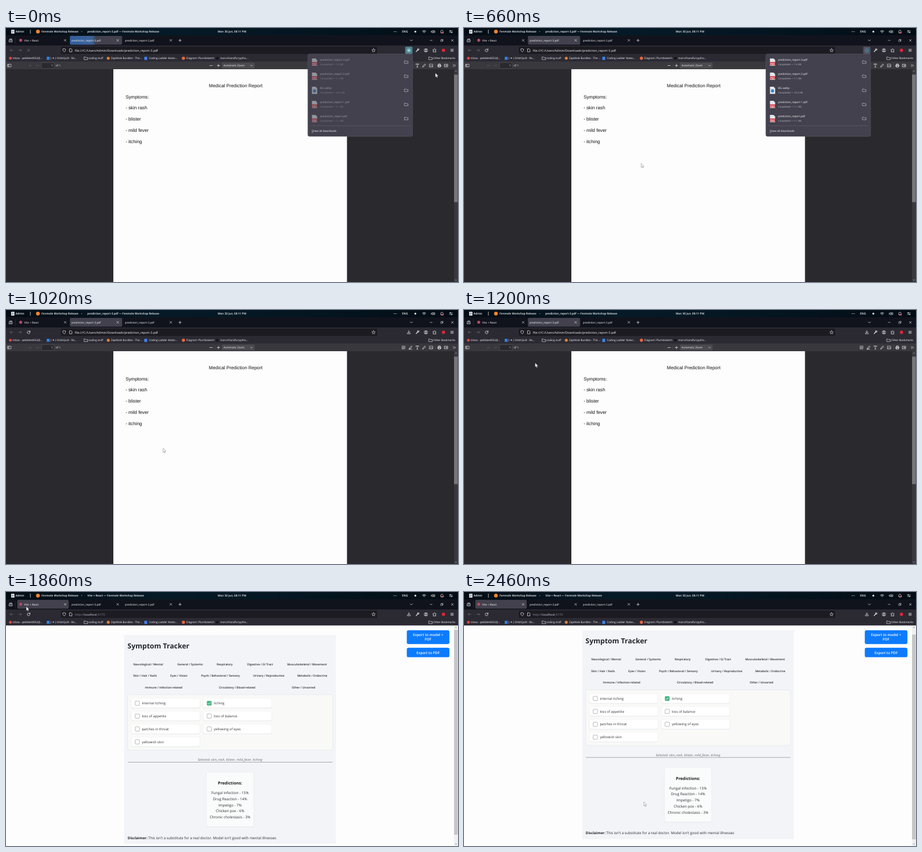
Recreate the animation shown at these times as an HTML page. Size 800x450 px, loop 2.52 s.

```html
<!DOCTYPE html>
<html lang="en">
<head>
<meta charset="utf-8">
<title>Symptom report</title>
<style>
  html, body { margin: 0; width: 100%; height: 100%; overflow: hidden; background: #2a2a2e; }
  svg { display: block; width: 100vw; height: 100vh; }
  text { font-family: "Open Sans", "Noto Sans", sans-serif; text-rendering: geometricPrecision; white-space: pre; }
  .pdf text { font-family: "Liberation Sans", Arial, sans-serif; }
</style>
</head>
<body>
<svg id="stage" viewBox="0 0 800 450" xmlns="http://www.w3.org/2000/svg"></svg>
<script>
const LOOP = 2520, STEP = 60;
const INK = '#fbfbfe', DIM = '#6f6e78';
const USER = 'Admin', BROWSER = 'Fenmole Workshop Release';

// Drawing helpers
const text = (x, y, s, size = 4.8, fill = INK, more = '') =>
  `<text x="${x}" y="${y}" font-size="${size}" fill="${fill}" ${more}>${s}</text>`;
const mid = (x, y, s, size, fill, more = '') => text(x, y, s, size, fill, `text-anchor="middle" ${more}`);
const rect = (x, y, w, h, fill, r = 0, more = '') =>
  `<rect x="${x}" y="${y}" width="${w}" height="${h}" rx="${r}" fill="${fill}" ${more}/>`;
const dot = (x, y, r, fill, more = '') => `<circle cx="${x}" cy="${y}" r="${r}" fill="${fill}" ${more}/>`;
const ring = (x, y, r, color = INK, w = 0.7) => dot(x, y, r, 'none', `stroke="${color}" stroke-width="${w}"`);
const line = (x, y, d, color = INK, w = 0.7) =>
  `<path transform="translate(${x} ${y})" d="${d}" fill="none" stroke="${color}" stroke-width="${w}" stroke-linecap="round" stroke-linejoin="round"/>`;
const group = (id, body, more = '') => `<g id="${id}" ${more}>${body}</g>`;
const bold = 'font-weight="700"', semi = 'font-weight="600"';

const CROSS = 'M-1.7-1.7 1.7 1.7M1.7-1.7-1.7 1.7';
const DOWN = 'M-2-1 0 1 2-1', UP = 'M-2 1 0-1 2 1';
const FOLDER = 'M-3-2.3h2.2l.8 1h3v3.6h-6z';
const SHEET = 'M-2-2.7h2.6l1.4 1.4v4h-4z';
const PANEL = 'M-3-2.3h6v4.6h-6zM-1-2.3v4.6M-2.3-.8h.6M-2.3.5h.6';
const PEN = 'M-2.5 2.5l.6-1.9 3.4-3.3 1.2 1.2-3.3 3.4z';

function titleBar() {
  return rect(0, 0, 800, 13.5, 'url(#sky)') +
    rect(9, 3, 6, 7, '#d9dde2', 0.8) + line(12, 6.5, 'M-1.6-1.5h3.2M-1.6 0h3.2M-1.6 1.5h2', '#59636d', 0.5) +
    text(17, 8.4, USER, 4.9, INK, semi) + rect(42.7, 3, 0.8, 7, '#dfe3e6') +
    dot(56.5, 6.4, 3.3, '#f0852d') + text(63, 8.4, BROWSER, 4.9, INK, semi) +
    dot(134, 6.5, 0.6, INK) +
    group('title', '') +
    mid(400, 8.4, 'Mon 30 Jun, 08:11 PM', 4.9, INK, semi) +
    [686.6, 688.8, 691].map(x => dot(x, 6.5, 0.6, INK)).join('') +
    text(701, 8.4, 'ENG', 5, INK, semi) + dot(724.5, 6.4, 1.7, '#e8eaee') +
    line(740, 7, 'M-3-1.4q3-2.6 6 0M-1.8.1q1.8-1.5 3.6 0M0 1.7v.1', INK, 0.8) +
    line(756, 6.5, 'M-3-.9h1.4l1.6-1.5v4.8l-1.6-1.5h-1.4zM1.2-1.2q1 1.2 0 2.4M2.4-2.2q1.8 2.2 0 4.4') +
    line(771.5, 6.5, 'M-2 1.4v-2q.2-2 2-2t2 2v2zM-.6 2.6h1.2') + dot(773.6, 8, 1.5, '#e5484d') +
    line(787.5, 6.5, 'M-2.6-1.3h5.2M-2.6 1.3h5.2') + dot(786.3, 5.2, 0.9, INK) + dot(788.8, 7.8, 0.9, INK);
}

function tabStrip() {
  const tabs = [[20, 32, 'Vite + React'], [113, 116, 'prediction_report-3.pdf'], [207, 210.5, 'prediction_report-2.pdf']];
  return rect(0, 13, 800, 18.5, '#11131c') +
    line(8.5, 22, 'M-2.5-1.2h5v3.8h-5zM-1.8-2.6h3.6M-.7.6h1.4') +
    rect(16, 16.5, 0.5, 11, '#3a3a46') +
    rect(20, 14, 91, 15.4, '#42414d', 2, 'id="tabApp"') +
    rect(113, 14, 92.5, 15.4, '#42414d', 2, 'id="tabPdf"') +
    rect(113, 14, 46, 15.4, 'url(#burst)', 2, 'id="flash"') +
    dot(26, 21.7, 2.6, '#b84a63') +
    tabs.map(([x, tx, s]) => text(tx, 23.6, s, 4.8) + line(x + 84.7, 21.8, CROSS, INK, 0.6)).join('') +
    line(308, 22, 'M-2.2 0h4.4M0-2.2v4.4') + line(717.5, 22, DOWN) +
    line(752.5, 22, 'M-1.8 0h3.6', INK, 0.6) + line(771.5, 22, 'M-1.8-.9h2.8v2.8h-2.8zM-.8-.9v-1h2.8v2.8h-1', INK, 0.5) +
    line(790, 22, CROSS, INK, 0.6);
}

function navBar() {
  return rect(0, 31, 800, 28.3, '#2b2a33') + rect(97, 33, 560, 13, '#1c1b22', 2) +
    line(10, 39.5, 'M2.6 0h-5.2M-.4-2.2-2.6 0l2.2 2.2', DIM) + line(25, 39.5, 'M-2.6 0h5.2M.4-2.2 2.6 0 .4 2.2', DIM) +
    group('stop', line(40, 39.5, CROSS, '#8d8c96')) +
    group('reload', line(40, 39.5, 'M2.3-.9a2.5 2.5 0 1 0 .2 1.4M2.6-2.7v2h-2')) +
    line(103, 39.5, 'M0-2.9l2.5.9q.2 3.6-2.5 5-2.7-1.4-2.5-5z') + line(114.8, 39.5, SHEET) +
    group('url', '') +
    line(650.5, 39.5, 'M0-3l.9 1.9 2.1.3-1.5 1.5.3 2.1-1.8-1-1.8 1 .3-2.1-1.5-1.5 2.1-.3z', INK, 0.6) +
    rect(706.5, 33, 13, 13, '#52525e', 2, 'id="dlBox"') +
    group('dlBusy', ring(713, 39.5, 3, '#8fe9f3', 0.8) + dot(713, 39.5, 1.6, '#c9f6f5')) +
    group('dlDone', ring(713, 39.5, 3, '#38b6e8') + line(713, 39.5, 'M-1.4 0l1 1.1 1.8-2', '#38b6e8')) +
    group('dlIdle', line(713, 39.3, 'M0-2.8v3.8M-1.7-.6 0 1.1 1.7-.6M-2.6 1.4v1.4h5.2v-1.4')) +
    line(728.2, 39.5, 'M-2.3 2.4l2.7-2.8', INK, 1.2) + line(728.5, 39.2, 'M2.6-1.6l-1.3 1.2-.9-.8 1.2-1.3q-2-.5-2.2 1.5 1 2 2.8.8.6-.5.4-1.4', INK, 0.7) +
    ring(743.2, 39.5, 3) + dot(743.2, 38.7, 1.1, INK) + line(743.2, 39.5, 'M-1.8 1.9q1.8-1.5 3.6 0', INK, 0.9) +
    line(758.5, 39.5, 'M-2.5-1.3h1.6q-.4-1.5.9-1.5t.9 1.5h1.6v1.5q-1.4-.2-1.4.8t1.4.8v1.2h-5v-1.4q1.3.1 1.3-.7t-1.3-.7z', INK, 0.6) +
    dot(774.3, 39.5, 2.9, '#e0263c') + line(789.5, 39.5, 'M-2.3-1.8h4.6M-2.3 0h4.6M-2.3 1.8h4.6');
}

function bookmarks() {
  const marks = [
    [12, 'Inbox - pebblet4052@...'], [79, '( ✦ ) OrbitQuilt - Ro...'], [146, 'coding stuff'],
    [186, 'ZapMole Bundles - The ...'], [253, 'Coding Ladder Notes...'],
    [319, 'Diagram: Plumbsketch'], [379, 'morvi/handful-pytho...'], [756, 'Other Bookmarks']];
  return marks.map(([x, s]) => text(x, 55.4, s, 4.75)).join('') +
    dot(7.8, 53.6, 2.5, '#e0473b') + rect(72, 51, 5.4, 5.4, '#2f7fe0') +
    line(141.5, 53.7, FOLDER, INK, 0.6) + dot(181, 53.6, 2.7, '#d9813a') + rect(244.8, 51, 5, 5.6, '#3f83f0') +
    dot(314, 53.6, 2.8, '#f2643c') + dot(374, 53.6, 2.7, '#17161c') + line(751.5, 53.7, FOLDER, INK, 0.6);
}

function scrollbar(top, bottom, track, thumb, arrow, thumbTop, thumbH, id) {
  return rect(793, top, 7, bottom - top, track) + rect(793, thumbTop, 6.5, thumbH, thumb, 0, `id="${id}"`) +
    line(796.4, top + 3.4, 'M-1.3.6 0-.6 1.3.6', arrow) + line(796.4, bottom - 3.4, 'M-1.3-.6 0 .6 1.3-.6', arrow);
}

function pdfView() {
  const rows = ['Symptoms:', '- skin rash', '- blister', '- mild fever', '- itching'];
  const tools =
    line(6, 66.5, PANEL, INK, 0.6) + line(43, 66.5, UP, DIM) + line(56, 66.5, DOWN, DIM) +
    rect(63, 61.3, 22, 10.4, '#2a2a2e', 1, 'stroke="#5f5f66" stroke-width=".5"') +
    text(82.5, 68.3, '1', 4.8, INK, 'text-anchor="end"') + text(88, 68.3, 'of 1', 4.8) +
    line(363, 66.5, 'M-2.3 0h4.6') + rect(369, 63, 0.4, 7, '#5c5c61') + line(376, 66.5, 'M-2.3 0h4.6M0-2.3v4.6') +
    rect(382, 61.2, 58, 10.6, '#4a4a4f', 1) + text(385, 68.3, 'Automatic Zoom', 4.8) + line(434.5, 66.6, 'M-1.5-.7 0 .8l1.5-1.5') +
    line(703.5, 66.5, 'M2.5-.5v3h-5v-5h3M-1 1l.4-1.3 2.7-2.7 1 1-2.7 2.6z', INK, 0.6) +
    line(716, 66.5, PEN + 'M-2.7 3h5', INK, 0.7) + line(728, 66.5, 'M-2.5-1.7v-1h5v1M0-2.7v5.4M-1 2.7h2') +
    line(740, 66.5, PEN) + line(752.5, 66.5, 'M-2.8-2.5h5.6v5h-5.6zM-2.4 1.7l1.8-2 1.2 1.2.8-.8 1.1 1.3', INK, 0.6) +
    rect(760, 63, 0.4, 7, '#5c5c61') +
    line(767, 66.5, 'M-1.6-.9v-1.9h3.2v1.9M-1.6 1.6h-1.2v-2.5h5.6v2.5h-1.2M-1.6.4h3.2v2.3h-3.2z', INK, 0.8) +
    line(779, 66.5, 'M-2.8-2.3h5.6v4.6h-5.6zM-1 0h2.2M.4-.9l.9.9-.9.9', INK, 0.7) +
    line(793.5, 66.5, 'M-2.2-1.8-.4 0l-1.8 1.8M.4-1.8 2.2 0 .4 1.8');
  return rect(0, 59, 800, 391, '#2a2a2e') + rect(190, 73, 413.5, 377, '#fdfdfd') +
    rect(0, 59, 800, 14, '#38383d') + tools +
    `<g class="pdf">${mid(406.5, 105, 'Medical Prediction Report', 8.3, '#111')}` +
    rows.map((s, i) => text(211.7, 124.6 + i * 19.75, s, 8.27, '#111')).join('') + '</g>' +
    scrollbar(73, 450, '#38383d', '#77777a', '#c9c9cc', 82.5, 226, 'thumbPdf');
}

function appView() {
  const ink = '#23272e';
  const tags = [
    [251.5, 0, 'Neurological / Mental'], [326, 0, 'General / Systemic'], [387, 0, 'Respiratory'],
    [449.8, 0, 'Digestive / GI Tract'], [532.8, 0, 'Musculoskeletal / Movement'],
    [246, 1, 'Skin / Hair / Nails'], [306, 1, 'Eyes / Vision'], [379.5, 1, 'Psych / Behavioral / Sensory'],
    [465, 1, 'Urinary / Reproductive'], [542, 1, 'Metabolic / Endocrine'],
    [279, 2, 'Immune / Infection-related'], [409, 2, 'Circulatory / Blood-related'], [526.5, 2, 'Other / Unsorted']];
  const signs = ['internal itching', 'itching', 'loss of appetite', 'loss of balance',
    'patches in throat', 'yellowing of eyes', 'yellowish skin'];
  const results = ['Fungal infection - 15%', 'Drug Reaction - 14%', 'Impetigo - 7%', 'Chicken pox - 6%', 'Chronic cholestasis - 3%'];
  const card = (x, y, w, h, fill) => rect(x - 0.5, y, w + 1, h + 1, '#dfe1e5', 3, 'opacity=".7"') + rect(x, y, w, h, fill, 3);
  const sign = (s, i) => {
    const x = 222 + (i % 2) * 127.3, y = 197 + (i >> 1) * 22.85, on = s === 'itching';
    return card(x, y - 8.2, 121, 16.2, '#fff') +
      rect(x + 6.6, y - 3.8, 7.6, 7.6, on ? '#3fb27f' : '#fff', 1, `stroke="${on ? '#3fb27f' : '#85868c'}" stroke-width=".6"`) +
      (on ? line(x + 10.4, y, 'M-2.2.1l1.6 1.6 2.9-3.3', '#fff', 1) : '') +
      text(x + 18.4, y + 2.1, s, 6.05, '#333');
  };
  const sheet = rect(209, 76, 375, 370, '#f3f4f7') +
    text(215, 99.5, 'Symptom Tracker', 12.5, ink, bold) +
    tags.map(([x, row, s]) => mid(x, 129.8 + row * 20.45, s, 5.07, ink, semi)).join('') +
    rect(215.5, 181.7, 362.5, 98.5, '#f9f9f8', 3, 'stroke="#dde1e6" stroke-width=".6"') +
    signs.map(sign).join('') +
    mid(396.5, 299.2, 'Selected: skin_rash, blister, mild_fever, itching', 5.75, '#6a6a6e', 'font-style="italic"') +
    rect(215.5, 301, 362.5, 0.8, '#929498') +
    card(355, 319.5, 83, 96, '#fafbfb') + mid(396.5, 341, 'Predictions:', 7.25, '#15171a', bold) +
    results.map((s, i) => mid(396.5, 357.9 + i * 10.85, s, 6.45, '#2b2d31')).join('') +
    text(215.3, 437.8, 'Disclaimer:', 6.25, ink, bold) +
    text(251.8, 437.8, 'This isn\'t a substitute for a real doctor. Model isn\'t good with mental illnesses', 6.33, ink);
  const label = (y, s) => mid(747, y, s, 6.25, '#fff', semi);
  return rect(0, 59, 800, 391, '#fdfdfd') + group('sheet', sheet) +
    rect(709.4, 67.7, 75.4, 24.6, '#0d7bfd', 3.2) + label(78.3, 'Export to model +') + label(86.3, 'PDF') +
    rect(709.4, 98.8, 75.4, 16.8, '#0d7bfd', 3.2) + label(109.5, 'Export to PDF') +
    scrollbar(59.3, 450, '#f0f0f0', '#c6c6c8', '#55565a', 67, 363, 'thumbApp');
}

function downloads() {
  const files = [['prediction_report-3.pdf', '1.0'], ['prediction_report-2.pdf', '1.1'], ['BG.webp', '23.2'],
    ['prediction_report-1.pdf', '1.1'], ['prediction_report.pdf', '1.1']];
  const file = ([name, size], i) => {
    const y = 60.4 + i * 25;
    const badge = name.endsWith('.pdf')
      ? rect(540.7, y, 10.6, 5.2, '#c9242f', 0.5) + mid(546, y + 4.1, 'PDF', 4.3, '#fff', bold)
      : dot(546, y + 1, 2.8, '#2f86c9');
    return `<path d="M541.5 ${y - 6.4}h6.4l2.8 2.8v10h-9.2z" fill="#e4e6ea"/>` + badge +
      text(556, y - 2.2, name, 4.8) + text(556, y + 5.5, `Completed — ${size} KB`, 4.3, '#bdbcc6');
  };
  return rect(534.2, 46, 185.4, 146, '#42414d', 3, 'stroke="#5b5b66" stroke-width=".6"') +
    group('files', files.map(file).join('')) +
    files.map((f, i) => line(708.5, 60.4 + i * 25, FOLDER, '#d5d4dc', 0.6)).join('') +
    rect(538, 172.8, 178, 0.6, '#65646f') +
    text(541, 183.8, '<tspan text-decoration="underline">S</tspan>how all downloads', 4.77);
}

document.getElementById('stage').innerHTML =
  `<defs><linearGradient id="sky"><stop offset="0" stop-color="#030c14"/><stop offset=".35" stop-color="#051a27"/>
   <stop offset=".7" stop-color="#041520"/><stop offset="1" stop-color="#030c14"/></linearGradient>
   <linearGradient id="burst"><stop offset="0" stop-color="#2f62a8"/><stop offset=".85" stop-color="#3b6aa6"/>
   <stop offset="1" stop-color="#42414d"/></linearGradient></defs>` +
  group('pdfView', pdfView()) + group('appView', appView()) +
  titleBar() + tabStrip() + navBar() + bookmarks() + group('popup', downloads()) +
  group('cursor', '<path d="M0 0v7l1.6-1.5 1.1 2.6 1.2-.5-1.1-2.5h2.2z" fill="#fff" stroke="#6a6a6e" stroke-width=".5" stroke-linejoin="round"/>');

const el = {};
document.querySelectorAll('#stage [id]').forEach(n => el[n.id] = n);

// Key tables: [time, value, ...]
const PATH = [[0, 760, 80], [120, 668, 56], [300, 462, 27], [420, 385, 95], [540, 335, 196], [720, 303, 262],
  [780, 299, 267], [900, 298, 256.5], [1020, 278, 245], [1080, 248, 228], [1200, 126, 94], [1380, 62, 40],
  [1560, 36, 21], [1800, 33, 19], [1860, 36, 26], [1980, 120, 165], [2100, 208, 276.5], [2220, 285, 345],
  [2340, 318.3, 372], [2520, 318.3, 372]];
const FADE = [[780, 1], [900, 0.82], [1020, 0]];
const SCROLL = [[2220, 0], [2280, 3.5], [2340, 7], [2400, 8.3]];
const FLASH = [[0, 0.85], [180, 0]];

function at(keys, t, col = 1) {
  if (t <= keys[0][0]) return keys[0][col];
  const i = keys.findIndex(k => k[0] > t);
  if (i < 0) return keys[keys.length - 1][col];
  const a = keys[i - 1], b = keys[i];
  return a[col] + (b[col] - a[col]) * (t - a[0]) / (b[0] - a[0]);
}
const show = (id, on) => el[id].style.display = on ? '' : 'none';

let page = '';
function setPage(name) {
  if (name === page) return;
  page = name;
  const app = name === 'app';
  show('appView', app);
  show('pdfView', !app);
  show('tabPdf', !app);
  el.title.innerHTML = text(144, 8.4, `${app ? 'Vite + React' : 'prediction_report-3.pdf'} — ${BROWSER}`, 4.9, INK, semi);
  el.url.innerHTML = app
    ? text(122, 41.5, 'http://<tspan fill="#d8d7de">localhost</tspan>:5173', 5.48, '#8f8e98')
    : text(122, 41.5, `file:///C:/Users/${USER}/Downloads/prediction_report-3.pdf`, 5.48);
}

function draw(now) {
  const t = Math.floor(now % LOOP / STEP) * STEP;
  const app = t >= 1860, busy = t < 240, fade = at(FADE, t), y = at(SCROLL, t);
  setPage(app ? 'app' : 'pdf');
  show('tabApp', t >= 1500);
  el.tabApp.setAttribute('opacity', app ? 1 : 0.75);
  el.flash.setAttribute('opacity', at(FLASH, t));
  show('stop', t < 420);
  show('reload', t >= 420);
  show('dlBox', t < 840);
  el.dlBox.setAttribute('fill', busy ? '#4f7f8c' : '#52525e');
  show('dlBusy', busy);
  show('dlDone', !busy && t < 1020);
  show('dlIdle', t >= 1020);
  show('popup', fade > 0);
  el.popup.setAttribute('opacity', fade);
  el.files.setAttribute('opacity', t < 480 ? 0.5 : 1);
  el.sheet.setAttribute('transform', `translate(0 ${-y})`);
  el.thumbApp.setAttribute('y', 67 + y);
  el.cursor.setAttribute('transform', `translate(${at(PATH, t)} ${at(PATH, t, 2)})`);
}

const start = performance.now();
function tick() {
  draw(performance.now() - start);
  requestAnimationFrame(tick);
}
tick();
</script>
</body>
</html>
```
